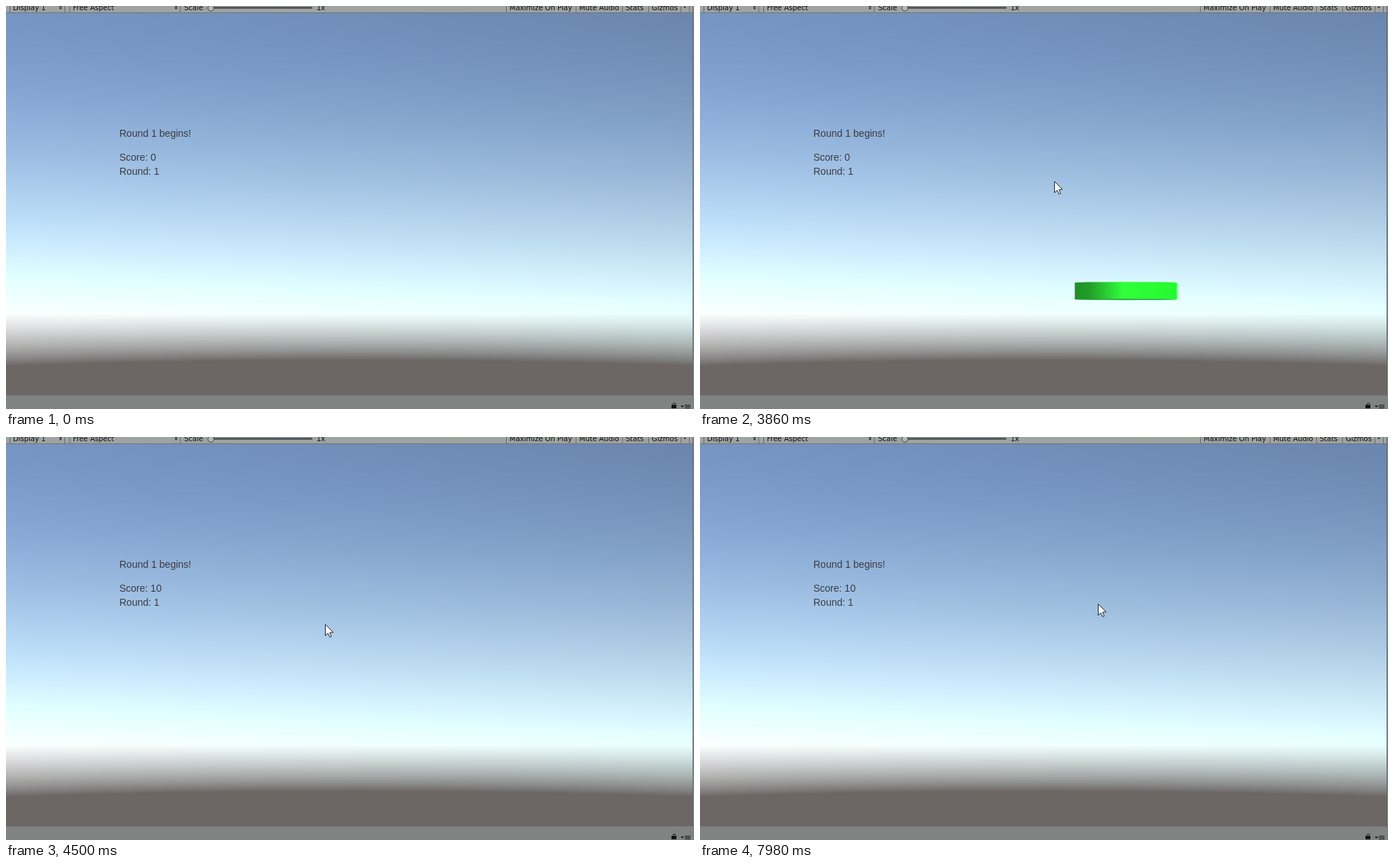
Animation of 977 by 573 pixels, one loop 8000 ms. Source, as an HTML page with a canvas:

```html
<!DOCTYPE html>
<html lang="en">
<head>
<meta charset="utf-8">
<title>Disc game view</title>
<style>
  html, body { margin: 0; width: 100%; height: 100%; overflow: hidden; background: #7f8382; }
  canvas { display: block; }
</style>
</head>
<body>
<canvas id="stage" width="977" height="573"></canvas>
<script>
const LOOP = 8000, W = 977, H = 573, TICK = 49;
const HORIZON = 437;
const FLIGHT = { start: 3790, hit: 4310, x: 621, y: 420, dx: -0.325, dy: -0.295 };
const ctx = document.getElementById('stage').getContext('2d');

// Pointer key points: start, end, x, y
const MOVES = [
  [90, 270, 631, 334],
  [1020, 1480, 527, 241],
  [1810, 1860, 510, 241],
  [3050, 3050, 507, 246],
  [3100, 3150, 505, 248],
  [3790, 3990, 501, 250],
  [4040, 4500, 453, 266],
  [4780, 4860, 453, 237],
  [5890, 6240, 382, 244],
  [6290, 6530, 425, 245],
  [6860, 6960, 488, 242],
  [7140, 7190, 493, 229],
  [7650, 7980, 565, 237]
];

const lerp = (a, b, p) => a + (b - a) * p;
const mixLight = (a, b, p) => Math.sqrt(lerp(a * a, b * b, p));

function rect(c, color, x, y, w, h) {
  c.fillStyle = color;
  c.fillRect(x, y, w, h);
}

function polygon(c, color, ...points) {
  c.beginPath();
  for (const [x, y] of points) c.lineTo(x, y);
  c.closePath();
  c.fillStyle = color;
  c.fill();
}

// The sky brightens towards the horizon and dims towards the right
function skyColor(p, y) {
  const dim = 1 - p * lerp(0.1, 0.07, y / HORIZON);
  return [
    118 + 130 * (y / 431) ** 1.7,
    149 + 105 * (y / 380) ** 1.6,
    193 + 62 * (y / 330) ** 1.3
  ].map(v => Math.min(255, v * dim));
}

function drawSky(c) {
  const image = c.createImageData(W, H);
  const ground = [108, 103, 101];
  for (let x = 0; x < W; x++) {
    const p = x / W, edge = 503 + 8 * (2 * p - 1) ** 2;
    for (let y = 0; y < H; y++) {
      const sky = skyColor(p, Math.min(y, HORIZON));
      const fade = Math.min(1, Math.max(0, (y - HORIZON) / (edge - HORIZON)));
      const rgb = sky.map((v, i) => mixLight(v, ground[i], fade));
      image.data.set([...rgb, 255], (y * W + x) * 4);
    }
  }
  c.putImageData(image, 0, 0);
}

function drawToolbar(c) {
  const separator = x => rect(c, '#686c6c', x, 0, 1, 9);
  const label = (text, x) => {
    c.fillStyle = '#111';
    c.fillText(text, x, 6);
  };
  const button = (text, x) => {
    separator(x - 5);
    label(text, x);
  };
  const dropdown = (text, x, right) => {
    button(text, x);
    separator(right);
    const mid = right - 5.5;
    polygon(c, '#222', [mid - 2, 1.5], [mid + 2, 1.5], [mid, -1]);
    polygon(c, '#222', [mid - 2, 2.5], [mid + 2, 2.5], [mid, 5]);
  };

  rect(c, '#9fa4a3', 0, 0, W, 9);
  rect(c, '#6e7479', 0, 9, W, 1);
  c.font = '10px "DejaVu Sans", sans-serif';
  dropdown('Display 1', 10, 83);
  dropdown('Free Aspect', 95, 247);
  label('Scale', 253);
  label('1x', 441);
  button('Maximize On Play', 715);
  button('Mute Audio', 814);
  button('Stats', 880);
  button('Gizmos', 917);
  separator(958);
  separator(970);
  polygon(c, '#333', [962, 1], [966, 1], [964, 3.5]);

  rect(c, '#545858', 294, 1, 141, 3);
  c.beginPath();
  c.arc(291, 3, 4.3, 0, 7);
  c.fillStyle = '#b4b8b7';
  c.fill();
  c.strokeStyle = '#3d4040';
  c.stroke();
}

function drawFooter(c) {
  rect(c, '#7f8482', 0, 553, W, 20);
  rect(c, '#6f7372', 0, 553, W, 1);
  rect(c, '#5e6366', 975, 0, 1, 554);
  rect(c, '#8f9494', 976, 0, 1, 554);
  // Padlock and menu icon
  rect(c, '#151515', 945, 567, 7, 5);
  c.strokeStyle = '#151515';
  c.beginPath();
  c.arc(949, 566.5, 2, Math.PI, 0);
  c.stroke();
  polygon(c, '#222', [958, 568], [963, 568], [960.5, 571]);
  for (let y = 567; y < 572; y += 2) rect(c, '#222', 964, y, 8, 1);
}

function drawLabels(score) {
  ctx.font = '14px "Liberation Sans", Arial, sans-serif';
  ctx.fillStyle = 'rgba(50, 50, 50, .92)';
  ctx.fillText('Round 1 begins!', 161, 186);
  ctx.fillText('Score: ' + score, 161, 220);
  ctx.fillText('Round: 1', 161, 240);
}

function drawDisc(x, y) {
  const r = 72.5, top = y - 12, bottom = y + 12;
  const tilt = Math.max(0.5, (HORIZON - bottom) * 0.047); // flatter near eye level
  const shade = ctx.createLinearGradient(x - r, 0, x + r, 0);
  shade.addColorStop(0, '#1e8f25');
  shade.addColorStop(0.15, '#229f29');
  shade.addColorStop(0.47, '#30ff39');
  shade.addColorStop(1, '#24fa2e');
  ctx.beginPath();
  ctx.ellipse(x, top, r, tilt, 0, Math.PI, 0);
  ctx.lineTo(x + r, bottom);
  ctx.lineTo(x - r, bottom);
  ctx.fillStyle = shade;
  ctx.fill();
  ctx.beginPath();
  ctx.ellipse(x, bottom, r, tilt, 0, 0, 7);
  ctx.fillStyle = '#35a548';
  ctx.fill();
}

function drawPointer(x, y) {
  ctx.save();
  ctx.translate(Math.round(x) + 0.5, Math.round(y) + 0.5);
  polygon(ctx, '#fff', [0, 0], [0, 16], [3.7, 12.6], [6.3, 18], [8.6, 17.2], [6.2, 11.6], [11.3, 11.3]);
  ctx.strokeStyle = '#1c222c';
  ctx.stroke();
  ctx.restore();
}

// Each move advances in equal held steps, the first one at its start time
function pointerAt(t) {
  let x = 939, y = 604; // below the stage, on the line of the first move
  for (const [start, end, toX, toY] of MOVES) {
    if (t < start) break;
    const count = Math.round((end - start) / TICK) + 1;
    const step = Math.floor((t - start) / TICK + 0.1) + 1;
    const p = t >= end ? 1 : Math.min(1, step / count);
    x = lerp(x, toX, p);
    y = lerp(y, toY, p);
  }
  return [x, y];
}

const backdrop = document.createElement('canvas');
backdrop.width = W;
backdrop.height = H;
const back = backdrop.getContext('2d');
drawSky(back);
drawToolbar(back);
drawFooter(back);

function render(t) {
  ctx.drawImage(backdrop, 0, 0);
  if (t >= FLIGHT.start && t < FLIGHT.hit) {
    const age = 50 * Math.floor((t - FLIGHT.start) / 50);
    drawDisc(FLIGHT.x + FLIGHT.dx * age, FLIGHT.y + FLIGHT.dy * age);
  }
  drawLabels(t < FLIGHT.hit ? 0 : 10);
  drawPointer(...pointerAt(t));
}

const began = performance.now();
function tick() {
  render((performance.now() - began) % LOOP);
  requestAnimationFrame(tick);
}
tick();
</script>
</body>
</html>
```
